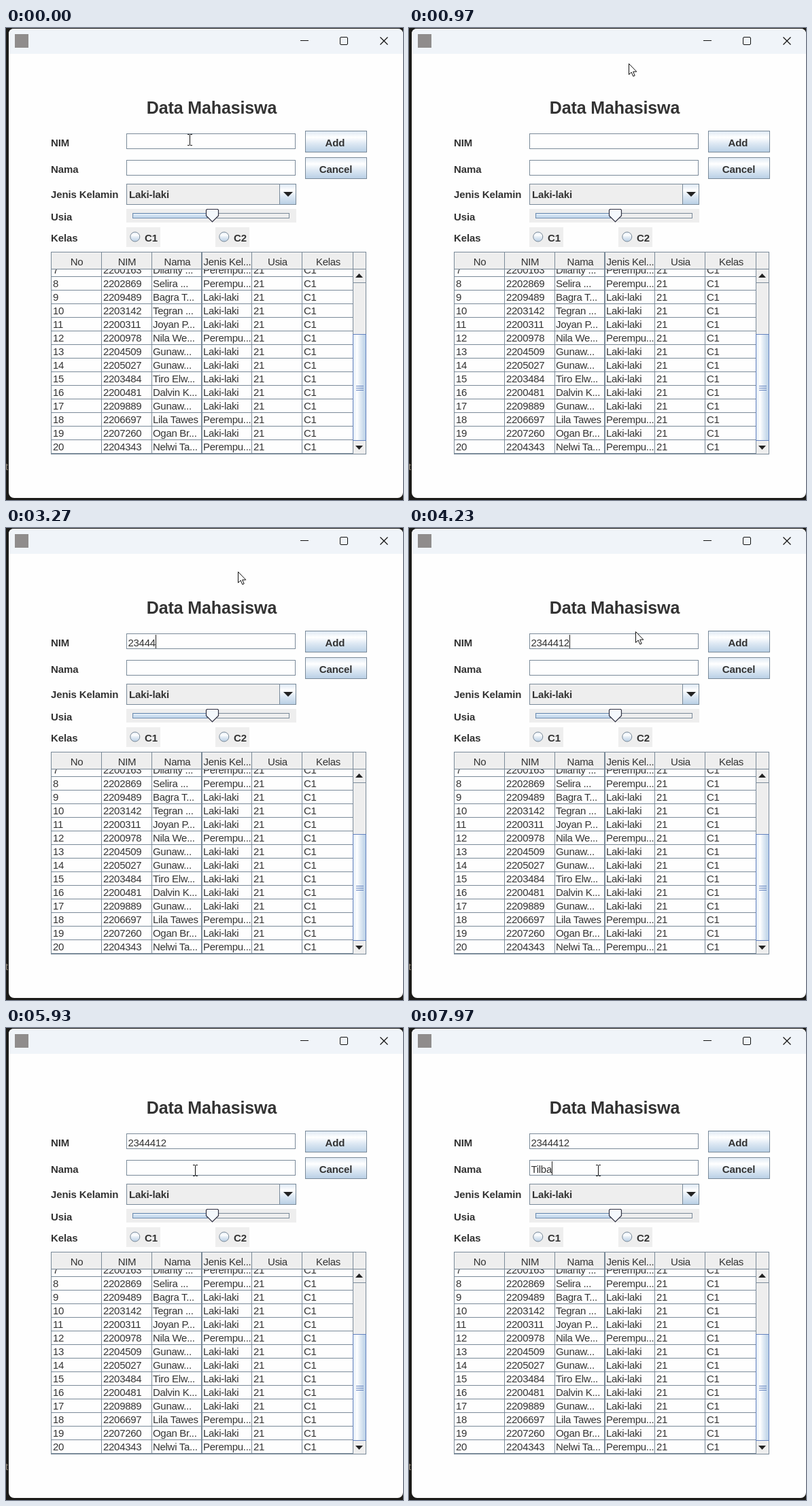
Write an HTML page that moves like this. It is 584x694 px and loops after 8 s.

```html
<!DOCTYPE html>
<html lang="id">
<head>
<meta charset="utf-8">
<title>Data Mahasiswa</title>
<style>
  html, body { margin: 0; width: 100%; height: 100%; overflow: hidden; background: #1c1b18; }
  svg { display: block; width: 584px; height: 694px; }
  text { font: 15px "Liberation Sans", Arial, sans-serif; fill: #333; letter-spacing: -.3px; white-space: pre; }
  .b { font-weight: 700; letter-spacing: -.12px; }
  .mid { text-anchor: middle; }
  rect, .crisp { shape-rendering: crispEdges; }
  .smooth { shape-rendering: auto; }
</style>
</head>
<body>
<svg id="stage" viewBox="0 0 584 694">
  <defs>
    <linearGradient id="metal" x2="0" y2="1">
      <stop offset="0" stop-color="#dde8f3"/><stop offset=".3" stop-color="#fff"/>
      <stop offset=".6" stop-color="#dde8f3"/><stop offset="1" stop-color="#b8cfe5"/>
    </linearGradient>
    <linearGradient id="thumb">
      <stop offset="0" stop-color="#dde8f3"/><stop offset=".3" stop-color="#fff"/>
      <stop offset=".6" stop-color="#dde8f3"/><stop offset="1" stop-color="#b8cfe5"/>
    </linearGradient>
    <clipPath id="rows"><rect x="67" y="355" width="443" height="271"/></clipPath>
  </defs>
  <g id="scene"></g>
  <path id="caret" class="crisp" stroke="#222"/>
  <g id="arrow"><path d="M.5 .5V16.5L4.2 13 6.8 19 9.2 18 6.7 12.2H11.8Z" fill="#fff" stroke="#111"/></g>
  <g id="beam"><path class="crisp" d="M-3 -7.5H0M1 -7.5H4M.5 -7V8M-3 8.5H0M1 8.5H4" fill="none" stroke="#111"/></g>
</svg>
<script>
const LOOP = 8000;
const NS = "http://www.w3.org/2000/svg";
const byId = id => document.getElementById(id);
const scene = byId("scene"), caret = byId("caret"), arrow = byId("arrow"), beam = byId("beam");
const EDGE = "#7a8a99", PANEL = "#eee", WHITE = "#fefefe", INK = "#222";

function add(tag, attrs, parent = scene) {
  const node = document.createElementNS(NS, tag);
  for (const k in attrs) node.setAttribute(k, attrs[k]);
  parent.appendChild(node);
  return node;
}
const box = (x, y, width, height, fill, more) => add("rect", { x, y, width, height, fill, ...more });
const frame = (x, y, w, h, fill, stroke = EDGE) => box(x + .5, y + .5, w - 1, h - 1, fill, { stroke });
const line = (d, stroke = EDGE) => add("path", { d, stroke, fill: "none", class: "crisp" });
const shape = (d, fill, more) => add("path", { d, fill, ...more });
function label(str, x, y, cls = "", parent = scene) {
  const node = add("text", { x, y, class: cls }, parent);
  node.textContent = str;
  return node;
}

// Window
label("t", -1, 650).style.fill = "#94897a";
add("rect", { x: 4, y: 1, width: 580, height: 690, rx: 8, fill: WHITE, class: "smooth" });
shape("M4 38V9Q4 1 12 1H576Q584 1 584 9V38Z", "#f0f4f9");
box(13, 9, 20, 20, "#8f8c8c");
line("M433 18.5H445", "#111");
add("rect", { x: 491.5, y: 13.5, width: 11, height: 11, rx: 1.5, fill: "none", stroke: "#111", class: "smooth" });
shape("M550.5 13.5L561.5 24.5M561.5 13.5L550.5 24.5", "none", { stroke: "#111", "stroke-width": 1.2 });

// Form
label("Data Mahasiswa", 302.5, 126, "b mid").style.fontSize = "25px";
[["NIM", 174], ["Nama", 213], ["Jenis Kelamin", 250], ["Usia", 283], ["Kelas", 314]]
  .forEach(([s, y]) => label(s, 66, y, "b"));

const fields = [155, 194].map(y => {
  frame(177, y, 249, 23, WHITE);
  return { y, text: label("", 179.5, y + 19) };
});

[["Add", 484, 151], ["Cancel", 485, 190]].forEach(([s, x, y]) => {
  frame(440, y, 91, 32, "url(#metal)");
  label(s, x, y + 23, "b mid");
});

frame(177, 229, 250, 31, PANEL);
frame(402, 229, 25, 31, "url(#metal)");
shape("M408 241H422L415 248Z", INK);
label("Laki-laki", 181, 250, "b");

box(177, 266, 250, 20, PANEL);
frame(186, 272, 231, 8, PANEL);
frame(186, 272, 110, 8, "#c8dbee", "#6f8db0");
line("M188 274.5H295", "#f4f8fc");
shape("M295.5 266.5H311.5L312.5 268V276L303.5 285 294.5 276V268Z", "#f4f8fc", { stroke: "#334", "stroke-width": 1.2 });

[["C1", 177], ["C2", 308]].forEach(([s, x]) => {
  box(x, 293, 50, 29, PANEL);
  add("circle", { cx: x + 12.8, cy: 307, r: 7, fill: "url(#metal)", stroke: EDGE });
  label(s, x + 27, 314, "b");
});

// Table
const TEXT_X = [69, 143, 216, 290, 364, 438];
frame(66, 329, 464, 298, WHITE);
box(67, 330, 462, 24, PANEL);
line("M66 354.5H530");
["No", "NIM", "Nama", "Jenis Kel...", "Usia", "Kelas"]
  .forEach((s, i) => label(s, [104, 178, 252, 325.5, 399.5, 474][i], 349, "mid"));

const L = "Laki-laki", P = "Perempu...";
const students = [
  ["2200163", "Dilanty ...", P], ["2202869", "Selira ...", P], ["2209489", "Bagra T...", L],
  ["2203142", "Tegran ...", L], ["2200311", "Joyan P...", L], ["2200978", "Nila We...", P],
  ["2204509", "Gunaw...", L], ["2205027", "Gunaw...", L], ["2203484", "Tiro Elw...", L],
  ["2200481", "Dalvin K...", L], ["2209889", "Gunaw...", L], ["2206697", "Lila Tawes", P],
  ["2207260", "Ogan Br...", L], ["2204343", "Nelwi Ta...", P]
];
const body = add("g", { "clip-path": "url(#rows)" });
students.forEach((who, r) => {
  const y = 361 + r * 20;
  [r + 7, ...who, 21, "C1"].forEach((s, c) => label(s, TEXT_X[c], y, "", body));
  line(`M66 ${y + 4.5}H510`);
});
[140, 214, 287, 288, 361, 435, 510].forEach(x => line(`M${x + .5} 330V626`));

// Scroll bar
box(511, 355, 18, 271, PANEL);
line("M529.5 330V627");
line("M511 374.5H529M511 606.5H529");
shape("M514 367H525L519.5 361Z", INK);
frame(510, 450, 20, 157, "url(#thumb)", "#6382bf");
line("M515 526.5H526M515 529.5H526M515 532.5H526", "#6382bf");
shape("M514 614H525L519.5 620Z", INK);

// Timeline
const typing = [
  { field: 0, word: "2344412", at: [1800, 2500, 2700, 2900, 3050, 3700, 3950] },
  { field: 1, word: "Tilba", at: [6700, 7000, 7250, 7450, 7700] }
];
const FOCUS_NAMA = 5300, BLINK = 500;
const HIDE = [1800, 3000];
const path = [
  [0, 270, 164], [350, 270, 164], [850, 323, 52], [3000, 323, 52], [3270, 341, 64],
  [3500, 341, 64], [4230, 333, 152], [4900, 278, 209], [LOOP, 278, 209]
];

function pointerAt(t) {
  const i = Math.max(1, path.findIndex(k => k[0] > t));
  const [t0, x0, y0] = path[i - 1], [t1, x1, y1] = path[i];
  const u = (t - t0) / (t1 - t0), e = u * u * (3 - 2 * u);
  return [Math.round(x0 + (x1 - x0) * e), Math.round(y0 + (y1 - y0) * e)];
}

function render(t) {
  for (const { field, word, at } of typing) {
    const text = word.slice(0, at.filter(k => k <= t).length);
    const node = fields[field].text;
    if (node.textContent !== text) node.textContent = text;
  }

  const active = t < FOCUS_NAMA ? 0 : 1;
  const start = active ? FOCUS_NAMA : -700;
  const last = Math.max(start, ...typing[active].at.filter(k => k <= t));
  const { y, text } = fields[active];
  const x = Math.round(180 + (text.textContent ? text.getComputedTextLength() : 0)) + .5;
  caret.setAttribute("d", `M${x} ${y + 2}V${y + 22}`);
  caret.style.display = Math.floor((t - last) / BLINK) % 2 ? "none" : "";

  const [px, py] = pointerAt(t);
  const shown = t < HIDE[0] || t >= HIDE[1];
  const over = fields.some(f => py >= f.y && py <= f.y + 23);
  for (const [node, on] of [[arrow, !over], [beam, over]]) {
    node.style.display = shown && on ? "" : "none";
    node.setAttribute("transform", `translate(${px} ${py})`);
  }
}

const begin = performance.now();
function tick() {
  render((performance.now() - begin) % LOOP);
  requestAnimationFrame(tick);
}
tick();
</script>
</body>
</html>
```
